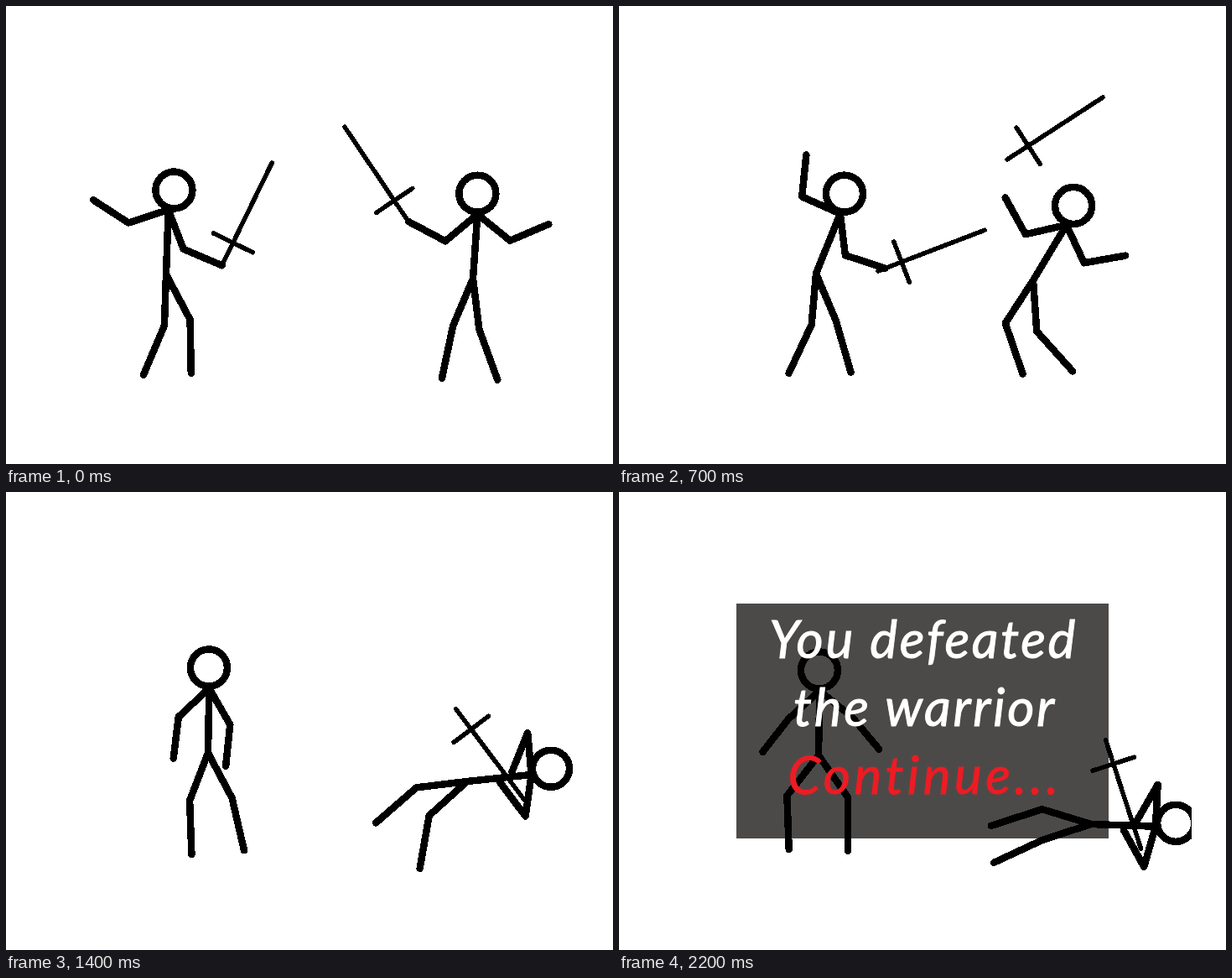
An HTML page for the animation above (2.3 s loop, 724 px wide and 546 px high).

```html
<!DOCTYPE html>
<html lang="en">
<head>
<meta charset="utf-8">
<title>Stick duel</title>
<style>
  html, body { margin: 0; width: 100%; height: 100%; overflow: hidden; background: #fff; }
  svg { display: block; overflow: hidden; }
  path { fill: none; stroke: #000; stroke-linecap: round; stroke-linejoin: round; shape-rendering: crispEdges; }
  #bodies { stroke-width: 8.5; }
  #swords { stroke-width: 5.5; }
  text { font: italic 62px Lato, "Open Sans", sans-serif; letter-spacing: 2.7px; text-anchor: middle; fill: #fff; stroke: #fff; }
  text.go { fill: #ed1c24; stroke: #ed1c24; letter-spacing: 4.5px; }
</style>
</head>
<body>
<svg width="683" height="546">
  <rect class="end" x="140" y="133" width="444" height="280" fill="#4c4a48"/>
  <path id="bodies"/>
  <path id="swords"/>
  <g class="end">
    <text x="363" y="198">You defeated</text>
    <text x="365" y="279">the warrior</text>
    <text x="365" y="360" class="go">Continue...</text>
  </g>
</svg>
<script>
const STEP = 100, STEPS = 23;
const TRUNK = 77, NECK = 24.5, HEAD = 22, ARM = 50, THIGH = 61, SHIN = 64;
const BLADE = 136, GUARD = 26, HILT = 30;

// Angles in degrees: torso is trunk and head, limbs are upper and lower part,
// blade is angle and slip behind the hand. A missing part keeps its last pose.
const hero = inherit([
  { at: 0, hip: [191, 320], torso: [-88, -74], back: [162, 213], front: [69, 23],
    legA: [92, 113], legB: [62, 89], blade: [-64, 0] },
  { at: 4, hip: [236, 320], torso: [-73, -83], back: [198, 268], front: [50, 0],
    legA: [85, 112], legB: [59, 81], blade: [-63, 3] },
  { at: 7, hip: [235, 319], torso: [-68, -78], back: [204, 276], front: [83, 18],
    legA: [95, 115], legB: [67, 74], blade: [-21, 9] },
  { at: 11, hip: [228, 310], torso: [-89, -91], back: [141, 171], front: [40, 36],
    legA: [103, 82], legB: [51, 67], blade: [-10, 9] },
  { at: 14, hip: [241, 311], back: [137, 97], front: [60, 96],
    legA: [111, 88], legB: [62, 77], blade: [53, 9] },
  { at: 18, hip: [238, 314], back: [163, 208], front: [24, -9],
    legA: [114, 87], legB: [55, 90], blade: [72, 9] },
  { at: 22, back: [138, 128], front: [39, 50], legA: [128, 88] }
]);

const hurt = { at: 11, torso: [-74, -85], back: [197, 404], front: [30, 165] };
const turn = (part, by) => part.map(angle => angle + by);
const fallen = (by, rest) => ({
  torso: turn(hurt.torso, by), back: turn(hurt.back, by), front: turn(hurt.front, by), ...rest
});
const rival = inherit([
  { at: 0, hip: [557, 325], torso: [-86, -90], back: [140, 208], front: [39, -23],
    legA: [113, 102], legB: [83, 70], blade: [-124, 0] },
  { at: 4, hip: [494, 327], torso: [-105, -116], back: [122, 195], front: [19, -55],
    legA: [123, 71], legB: [86, 48], blade: [-120, 0] },
  { at: 7, torso: [-59, -70], back: [167, 241], front: [65, -10], blade: [-33, 0] },
  hurt,
  fallen(68, { at: 14, hip: [550, 345], legA: [173, 139], legB: [138, 100] }),
  fallen(76, { at: 18, hip: [563, 396], legA: [197, 162], legB: [162, 155] })
]);

function inherit(poses) {
  let last = {};
  return poses.map(p => last = { ...last, ...p });
}

const clamp = v => Math.min(1, Math.max(0, v));
const mix = (p, q, u) => p.map((v, i) => v + (q[i] - v) * u);

function poseAt(poses, step) {
  const i = poses.findIndex(p => p.at > step);
  if (i < 0) return poses[poses.length - 1];
  const a = poses[i - 1], b = poses[i], u = (step - a.at) / (b.at - a.at), out = {};
  for (const part in a) if (part !== 'at') out[part] = mix(a[part], b[part], u);
  return out;
}

function move([x, y], angle, length) {
  const r = angle * Math.PI / 180;
  return [x + length * Math.cos(r), y + length * Math.sin(r)];
}

const line = (...points) => 'M' + points.map(p => p.map(v => v.toFixed(1))).join('L');

function limb(from, [p, q], upper, lower) {
  const joint = move(from, p, upper);
  return [from, joint, move(joint, q, lower)];
}

function figure(poses, step, lift = 0) {
  const { hip: [x, y], torso, back, front, legA, legB, blade } = poseAt(poses, step);
  const hip = [x, y - lift], neck = move(hip, torso[0], TRUNK);
  const [cx, cy] = move(neck, torso[1], NECK);
  const backArm = limb(neck, back, ARM, ARM), frontArm = limb(neck, front, ARM, ARM);
  const d = line(hip, neck) + line(...backArm) + line(...frontArm) +
    line(...limb(hip, legA, THIGH, SHIN)) + line(...limb(hip, legB, THIGH, SHIN)) +
    `M${cx - HEAD} ${cy}a${HEAD} ${HEAD} 0 1 1 ${2 * HEAD} 0a${HEAD} ${HEAD} 0 1 1 ${-2 * HEAD} 0`;
  return { d, neck, blade, backHand: backArm[2], frontHand: frontArm[2] };
}

function sword(grip, angle) {
  const guard = move(grip, angle, HILT);
  return line(grip, move(grip, angle, BLADE)) +
    line(move(guard, angle - 90, GUARD), move(guard, angle + 90, GUARD));
}

// Held, then thrown, then stuck in the rival's chest.
function heroSword(step, left, right) {
  const [angle, slip] = left.blade;
  const held = move(left.frontHand, angle, -slip);
  const stuck = move(right.neck, angle + 168, 119);
  return sword(mix(held, stuck, clamp((step - 9) / 2)), angle);
}

// Held, then knocked away on a spinning arc until it has left the stage.
function rivalSword(step, right) {
  if (step < 7) return sword(right.backHand, right.blade[0]);
  if (step > 12) return '';
  const u = Math.min(4, step - 7);
  return sword([463 + 53 * u, 183 - 45.5 * u + 6.75 * u * u], -33 + 14 * u);
}

function draw(now) {
  const step = Math.floor(now / STEP) % STEPS;
  const jump = 60 * Math.sin(Math.PI * clamp((step - 17) / 5));
  const left = figure(hero, step, jump), right = figure(rival, step);
  bodies.setAttribute('d', left.d + right.d);
  swords.setAttribute('d', heroSword(step, left, right) + rivalSword(step, right));
  ends.forEach(e => e.style.display = step === STEPS - 1 ? '' : 'none');
}

const bodies = document.getElementById('bodies'), swords = document.getElementById('swords');
const ends = document.querySelectorAll('.end');
const start = performance.now();
function tick() {
  draw(performance.now() - start);
  requestAnimationFrame(tick);
}
tick();
</script>
</body>
</html>
```
